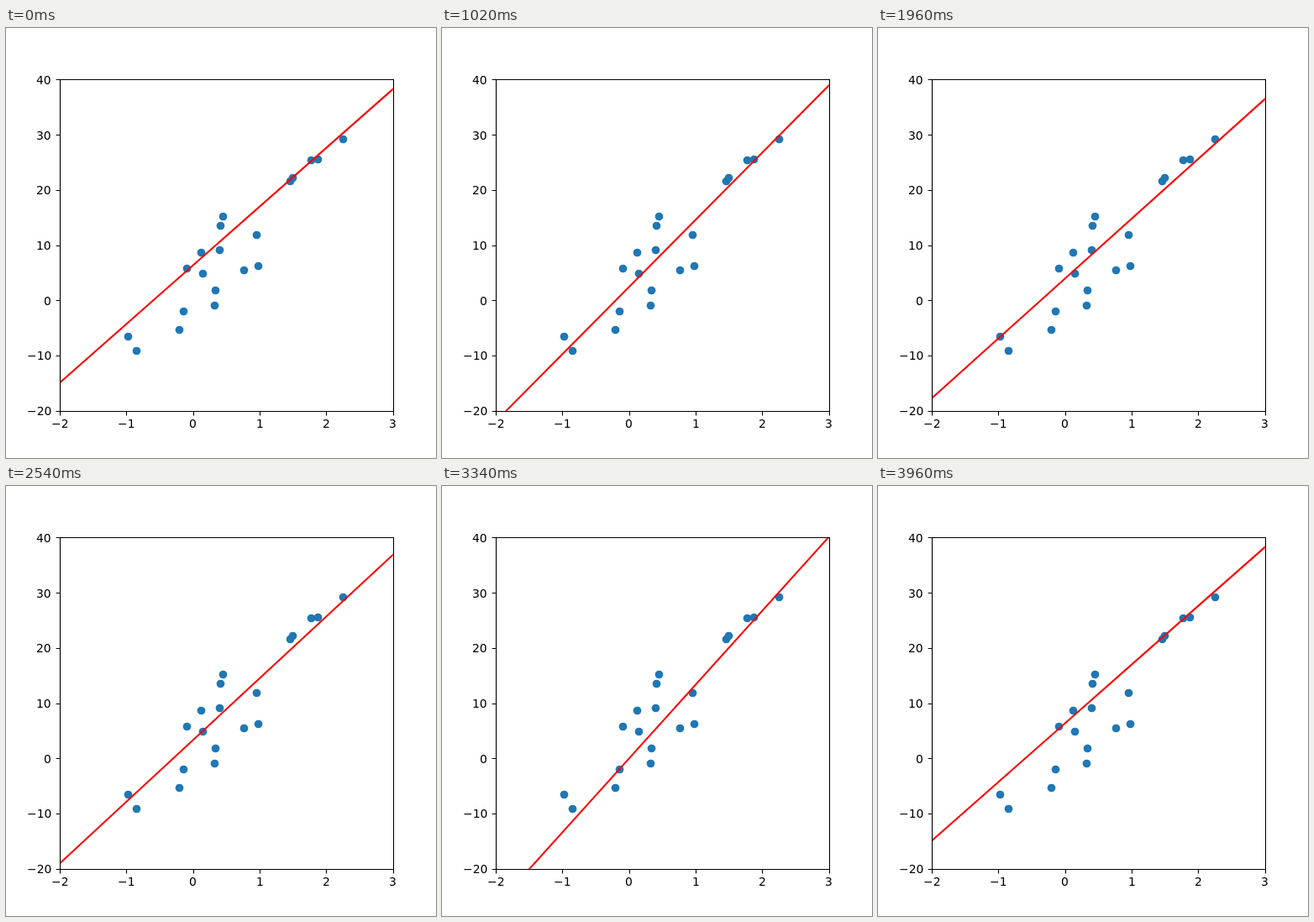
Animation, 512 px wide and 512 px high, one loop 3.98 s. Source, as an HTML page:

```html
<!DOCTYPE html>
<html lang="en">
<head>
<meta charset="utf-8">
<title>Line fit</title>
<style>
html, body { margin: 0; width: 100%; height: 100%; overflow: hidden; background: #fff }
svg { display: block }
text { font: 13.89px "DejaVu Sans", sans-serif }
</style>
</head>
<body>
<svg id="plot" width="512" height="512" viewBox="0 0 512 512">
  <clipPath id="area"><rect x="64" y="61.44" width="396.8" height="394.24"/></clipPath>
  <g id="dots" fill="#1f77b4"></g>
  <path id="fit" stroke="#f00" stroke-width="2.08" clip-path="url(#area)"/>
  <path id="axes" fill="none" stroke="#000" stroke-width="1.11"/>
  <g id="labels"></g>
</svg>
<script>
const $ = id => document.getElementById(id);
const px = x => 222.72 + 79.36 * x;
const py = y => 324.27 - 6.5707 * y;
const snap = v => Math.round(v) + 0.5;

function add(parent, tag, attrs, text = '') {
  const el = document.createElementNS('http://www.w3.org/2000/svg', tag);
  for (const name in attrs) el.setAttribute(name, attrs[name]);
  el.textContent = text;
  $(parent).append(el);
  return el;
}

// Mersenne Twister (MT19937); only its first 227 outputs are needed
function twister(seed) {
  const s = [seed];
  for (let i = 1; i < 624; i++) {
    s[i] = (Math.imul(1812433253, s[i - 1] ^ (s[i - 1] >>> 30)) + i) >>> 0;
  }
  let i = 0;
  const next = () => {
    const mix = (s[i] & 0x80000000) | (s[i + 1] & 0x7fffffff);
    let v = s[i + 397] ^ (mix >>> 1) ^ (mix & 1 ? 0x9908b0df : 0);
    i++;
    v ^= v >>> 11;
    v ^= (v << 7) & 0x9d2c5680;
    v ^= (v << 15) & 0xefc60000;
    return (v ^ (v >>> 18)) >>> 0;
  };
  return () => {
    const high = next() >>> 5, low = next() >>> 6;
    return (high * 2 ** 26 + low) / 2 ** 53;
  };
}

// Normal deviates by the polar method, made in pairs
function normals(random, count) {
  const out = [];
  while (out.length < count) {
    const a = 2 * random() - 1, b = 2 * random() - 1;
    const r = a * a + b * b;
    if (r >= 1 || r === 0) continue;
    const f = Math.sqrt(-2 * Math.log(r) / r);
    out.push(f * b, f * a);
  }
  return out;
}

// Linear data with noise
const random = twister(0);
const xs = normals(random, 20);
const trend = 100 * random();
const noise = normals(random, 20);
xs.forEach((x, i) => add('dots', 'circle', {
  cx: snap(px(x)), cy: snap(py(trend * x + 5 * noise[i])), r: 4.86
}));

// Labels start on whole pixels; align is the share of the width left of x
function label(value, x, y, align) {
  const el = add('labels', 'text', { y }, String(value).replace('-', '\u2212'));
  const left = x - align * el.getComputedTextLength();
  el.setAttribute('x', Math.round(left));
}

let axes = 'M64.5 61.5H461.5V456.5H64.5Z';
for (let x = -2; x <= 3; x++) {
  axes += `M${snap(px(x))} 456.5v4.9`;
  label(x, px(x), 476, 0.5);
}
for (let y = -20; y <= 40; y += 10) {
  axes += `M64.5 ${snap(py(y))}h-4.9`;
  label(y, 53.8, Math.round(py(y) + 5.5), 1);
}
$('axes').setAttribute('d', axes);

// Key poses of the fit: step, line value at x = -2, line value at x = 3
const keys = [
  [0, -14.94, 38.29], [9, -22, 40.4], [31, -26.8, 40.15], [54, -21.2, 38.8],
  [71, -19.05, 36.9], [85, -20.8, 39.1], [99, -17.5, 36.3]
];

function ends(step) {
  const i = Math.max(1, keys.findIndex(k => k[0] >= step));
  const a = keys[i - 1], b = keys[i];
  const u = (step - a[0]) / (b[0] - a[0]);
  return [1, 2].map(j => a[j] + (b[j] - a[j]) * u);
}

// The fit runs forward for 99 steps, then back
function draw(time) {
  const tick = Math.floor(time % 3980 / 20);
  const [left, right] = ends(99 - Math.abs(99 - tick));
  const slope = (right - left) / 5;
  $('fit').setAttribute('d',
    `M${px(-3)} ${py(left - slope)}L${px(4)} ${py(right + slope)}`);
}

const start = performance.now();
function loop() {
  draw(performance.now() - start);
  requestAnimationFrame(loop);
}
loop();
</script>
</body>
</html>
```
